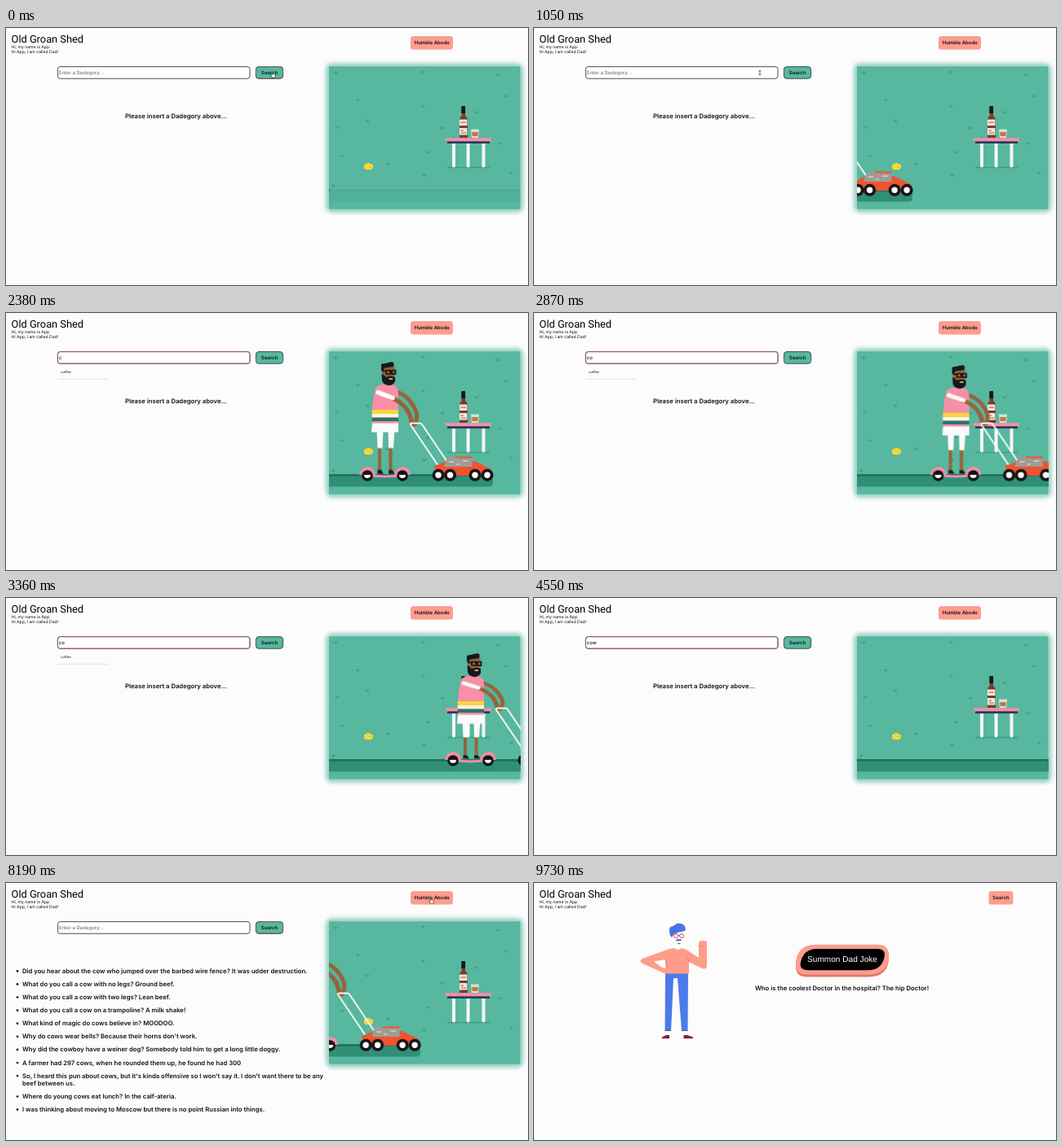
Animation of 640 by 316 pixels, one loop 9800 ms. Source, as an HTML page:

```html
<!DOCTYPE html>
<html lang="en">
<head>
<meta charset="utf-8">
<title>Old Groan Shed</title>
<style>
  html, body { margin: 0; width: 100%; height: 100%; overflow: hidden; background: #fcfcfc; }
  svg { display: block; width: 100%; height: 100%; }
  text { font: 600 7.7px Inter, "Open Sans", sans-serif; fill: #111; white-space: pre; text-rendering: geometricPrecision; }
  .title { font: 400 12.8px Roboto, Inter, sans-serif; fill: #000; }
  .sub { font-size: 5.1px; font-weight: 400; }
  .btn { font-size: 6px; text-anchor: middle; }
  .field { font-size: 6px; font-weight: 500; }
  .hint { fill: #777; }
  .option { font-size: 4.2px; font-weight: 400; }
  .summon { font: 400 10.1px "Liberation Sans", Arial, sans-serif; fill: #fff; text-anchor: middle; }
  .line { fill: none; stroke-linecap: round; stroke-linejoin: round; }
  .glow { filter: blur(2.6px); }

  .ride { animation: ride 9.8s linear infinite; }
  .trail { animation: trail 9.8s linear infinite; }
  .bob { animation: bob 653.333ms ease-in-out -233.333ms infinite; }
  .squash { animation: squash 653.333ms ease-in-out -233.333ms infinite; }
  .arm { transform-origin: 500px 137px; }
  .legs { transform-origin: 465px 195px; }
  .cursor { animation: cursor 9.8s ease-in-out infinite; }

  @keyframes ride {
    0%, 3.78% { transform: translateX(-201px); }
    17.86% { transform: translateX(-63px); }
    24.29% { transform: translateX(0); }
    34.29% { transform: translateX(105px); }
    43.88% { transform: translateX(206px); }
    43.89%, 72.14% { transform: translateX(-201px); }
    86.22% { transform: translateX(-63px); }
    100% { transform: translateX(77px); }
  }
  @keyframes trail {
    0% { opacity: .15; }
    4%, 43.87% { opacity: 0; }
    43.88%, 48% { opacity: 1; }
    57%, 68.5% { opacity: .15; }
    72.5%, 100% { opacity: 0; }
  }
  @keyframes bob { 50% { transform: translateY(8px); } }
  @keyframes squash { 50% { transform: scaleY(.82); } }
  @keyframes cursor {
    0%, 3% { transform: translate(327px, 55px); }
    11.5%, 48% { transform: translate(276px, 55px); }
    53%, 59% { transform: translate(324px, 55px); }
    62.8%, 76% { transform: translate(338px, 71px); }
    84%, 100% { transform: translate(522px, 19px); }
  }
</style>
</head>
<body>
<svg viewBox="0 0 640 316" preserveAspectRatio="none">
  <defs>
    <clipPath id="lawn"><rect x="396" y="47.3" width="234.5" height="175.4"/></clipPath>
    <g id="wheel"><circle r="7.5" fill="#151515"/><circle r="3.7" fill="#fff"/></g>
    <g id="fender">
      <path d="M-10 0Q-8-10 1-10Q9-9 10 0Z" fill="#f58ca8"/>
      <circle cy="1" r="6.8" fill="#151515"/><path d="M-4 0A4 4 0 0 0 4 0Z" fill="#fff"/>
    </g>
  </defs>

  <text class="title" x="6.6" y="17.6">Old Groan Shed</text>
  <text class="sub" x="6.6" y="25.2">Hi, my name is App.</text>
  <text class="sub" x="6.6" y="31.3">Hi App, I am called Dad!</text>

  <!-- search page -->
  <g data-on="0-8540">
    <rect x="496" y="10" width="52" height="16.5" rx="3.5" fill="#ff9c8f"/>
    <text class="btn" x="522.2" y="20.4">Humble Abode</text>

    <rect x="63.4" y="47.6" width="235.6" height="14.6" rx="3" fill="#fff" stroke="#3a3a3a" stroke-width=".9"/>
    <rect data-on="1400-5600" x="63.4" y="47.6" width="235.6" height="14.6" rx="3" fill="none" stroke="#9c5867" stroke-width=".9"/>
    <text data-on="0-2240,5810-8540" class="field hint" x="64.8" y="57.2">Enter a Dadegory...</text>
    <text data-on="2240-2800" class="field" x="64.8" y="57.2">c</text>
    <text data-on="2800-3700" class="field" x="64.8" y="57.2">co</text>
    <text data-on="3700-5810" class="field" x="64.8" y="57.2">cow</text>

    <rect x="306.4" y="47.6" width="33.2" height="14.6" rx="3.5" fill="#57b79f" stroke="#33413d" stroke-width=".9"/>
    <rect data-on="0-650,5100-8540" x="306.4" y="47.6" width="33.2" height="14.6" rx="3.5" fill="none" stroke="#8a5f5c" stroke-width=".9"/>
    <text class="btn" x="323" y="57.1">Search</text>

    <g data-on="1400-2240">
      <text class="option" x="67" y="73.6">staff</text>
      <text class="option" x="67" y="85.6">balloon</text>
      <text class="option" x="67" y="97.6">bird</text>
      <text class="option" x="67" y="109.6">coffee</text>
      <path d="M64 117.5H126" stroke="#c4c4c4" stroke-width=".8"/>
    </g>
    <g data-on="2240-3700">
      <text class="option" x="67" y="73.6">coffee</text>
      <path d="M64 81.3H126" stroke="#d8d8d8" stroke-width=".7"/>
    </g>

    <text data-on="0-5810" x="146" y="110.8">Please insert a Dadegory above...</text>
    <g id="jokes" data-on="5810-8540"></g>

    <rect class="glow" x="392" y="43.2" width="242.4" height="183.8" rx="8" fill="#57b79f" opacity=".62"/>
    <g clip-path="url(#lawn)">
      <rect x="396" y="47" width="235" height="176" fill="#57b79f"/>
      <path id="tufts" class="line" stroke="#3a947e" stroke-width=".9"/>
      <g class="trail">
        <path d="M396 198H631V213.6H396Z" fill="#2f9077"/>
        <path d="M396 198H631V201H396Z" fill="#23745f"/>
      </g>
      <g class="ride">
        <path d="M90 198H597V209Q597 213.6 592 213.6H90Z" fill="#2f9077"/>
        <path d="M90 198H590V201H90Z" fill="#23745f"/>
      </g>

      <path d="M439 171Q438 167 442 167Q444 164.500 447 167Q451 167.500 450 172Q448 175 444 174Q439 175 439 171Z" fill="#f4da35"/>
      <path d="M443 169L445 170M446 171L448 171" class="line" stroke="#d3b524" stroke-width=".7"/>

      <!-- table, bottle, glass -->
      <path d="M541 171.500H593" stroke="#3f9c86" stroke-width="1.500"/>
      <path d="M549 142V169.500M566.600 142V169.500M585.500 142V169.500" class="line" stroke="#f7f7f5" stroke-width="4"/>
      <path d="M541 138.500H593V142H541Z" fill="#2d3a5c"/>
      <path d="M538 135.200H595.500L594 139.200H540Z" fill="#f490a6"/>
      <path d="M558.700 103H563V108Q566 110 566 113V135H556V113Q556 110 558.700 108Z" fill="#7c3a2b"/>
      <rect x="558.300" y="96" width="4.800" height="9" rx="1" fill="#15191a"/>
      <path d="M556 112.500H565.500V120H556ZM556 123H565.500V131.500H556Z" fill="#efe6dc"/>
      <path d="M557.500 116H564M557.500 126H561" stroke="#b54b40" stroke-width="1.200"/>
      <path d="M558 129H564" stroke="#555" stroke-width=".8"/>
      <path d="M570 124.500H580L579.200 135H570.800Z" fill="#cfe3d5"/>
      <path d="M571.200 128H578.800L578.400 133H571.600Z" fill="#d2733a"/>

      <!-- rider and mower -->
      <g class="ride">
        <path d="M443 199Q464 203 486 199" class="line" stroke="#f58ca8" stroke-width="3"/>
        <use href="#fender" x="443" y="199"/>
        <use href="#fender" x="486" y="199"/>

        <g class="squash legs">
          <path d="M458 164V193M471.500 164V193" stroke="#96643a" stroke-width="4"/>
          <path d="M454.500 142H462.500L461.500 166H455.500ZM468.500 142H476.500L475 166H469Z" fill="#fbfbf9"/>
          <path d="M455.500 198V193H460L463 198ZM469 198V193H473.500L476.500 198Z" fill="#1b1b1d"/>
        </g>
        <path d="M479 97Q496 103 503 122Q505 130 501 137" class="line squash arm" stroke="#96643a" stroke-width="5"/>
        <g class="bob">
          <path d="M453 92Q456 88 464 87.500H472Q481 89 481 98V136H449Q448 110 453 92Z" fill="#f78fa7"/>
          <path d="M448.700 119H481V124H448.700Z" fill="#f6d936"/>
          <path d="M448.700 124H481V128.500H448.700Z" fill="#f7f4ee"/>
          <path d="M448.700 128.500H481V133H448.700Z" fill="#2b7569"/>
          <path d="M449 135.500H481V146.500H448Z" fill="#fbfbf9"/>
          <path d="M461 66H476.500V82H461Z" fill="#96643a"/>
          <path d="M460.500 75L463 76L466 79Q471 76 477 79V84Q475 89 469 89Q462 88 461 83Z" fill="#17181b"/>
          <path d="M460 70V65Q459 62 464 62L473 60Q477 61 475 66L464 67.500L462 72Z" fill="#17181b"/>
          <path d="M466 70.500H471V75H466ZM473 70.500H477.500V75H473Z" fill="#96643a" stroke="#111" stroke-width="1.600"/>
          <path d="M461 71.500H466M471 72H473" stroke="#111" stroke-width="1.300"/>
          <path d="M469.500 81H474" stroke="#f2d5cf" stroke-width="1.500"/>
        </g>
        <g class="squash arm">
          <path d="M471 103.500Q486 109 493 121Q497 129 498 137" class="line" stroke="#96643a" stroke-width="5.500"/>
          <path d="M456 97.500L474 104.500" class="line" stroke="#fbfbf9" stroke-width="5.500"/>
        </g>

        <path d="M530 188L496 137.500Q495 135.500 498 135.500H507Q509 135.500 510 137L541 183" class="line" stroke="#f6f6f3" stroke-width="2"/>
        <path d="M525 188L541 182H574L593 191Q597 193 596 200H528Z" fill="#f0532f"/>
        <path d="M537 189L541 177H571.500V189Z" fill="#9f9c98"/>
        <path d="M551 177.500H571" stroke="#f0532f" stroke-width="2"/>
        <path d="M543 183H549M552 186H556M560 182H567" stroke="#d3d0ca" stroke-width="1.600"/>
        <use href="#wheel" x="530" y="199.300"/>
        <use href="#wheel" x="544.500" y="199.300"/>
        <use href="#wheel" x="575" y="199.300"/>
        <use href="#wheel" x="590" y="199.300"/>
      </g>
    </g>

    <g data-on="0-2170,4690-8540"><g class="cursor">
      <path data-on="0-550,5100-5900,8000-8540" d="M-.6-1Q0-1.800.6-1V1.500L3 2.200Q3.600 2.500 3.200 4L2.600 6H-.6L-2.400 3Q-2.400 2-1.200 2.600L-.6 3Z" fill="#fff" stroke="#111" stroke-width=".6"/>
      <path data-on="550-2170,4690-5100" d="M-1.200-2.600Q0-2.600 0-1.800Q0-2.600 1.200-2.600M0-2V2M-1.200 2.600Q0 2.600 0 1.800Q0 2.600 1.200 2.600" class="line" stroke="#222" stroke-width=".7"/>
      <path data-on="5900-8000" d="M0 0V4.300L1 3.500L1.700 5L2.500 4.600L1.800 3.200H3.100Z" fill="#111" stroke="#fff" stroke-width=".3"/>
    </g></g>
  </g>

  <!-- single joke page -->
  <g data-on="8540-9800">
    <rect x="557.500" y="10" width="30" height="16.500" rx="3.500" fill="#ff9c8f"/>
    <text class="btn" x="572.500" y="20.400">Search</text>

    <path d="M161 110H189L188.500 182H181L176 117H171L168 182H160.500Z" fill="#4a7bea"/>
    <path d="M160.500 181.500H168M181 181.500H188.500" stroke="#3557b5" stroke-width="1.200"/>
    <path d="M157 191.300V189.500L162 187H166V191.300ZM183.500 191.300V187H188L195 189.500V191.300Z" fill="#84243f"/>
    <path d="M166 81L172 80Q177 84 181 80L187 82L202 92V74Q202 71 205 71H209Q212 71 212 74V102Q211 107 206 105L190 97V111.500H161L133 99Q128 96 133 93ZM161 94L147 96.500L157 104L161.500 105Z" fill="#ff9c8a" fill-rule="evenodd"/>
    <path d="M202 78H207M161 94L163 104M190 97L188 91" class="line" stroke="#db7567" stroke-width=".7"/>
    <path d="M168 60H185V71Q184 77 178 78L173 81L172 76Q168 72 168 60Z" fill="#fff"/>
    <path d="M166 60Q165 53 171 53Q176 47 183 51Q187 54 185 59Q177 60 171 63L169 67Q166 64 166 60Z" fill="#4a72e4"/>
    <path d="M169 64H171.500M176.500 64.500H178.500" stroke="#c94a62" stroke-width=".9"/>
    <g fill="none" stroke="#c94a62" stroke-width="1"><circle cx="174" cy="65" r="2.500"/><circle cx="181" cy="65" r="2.500"/></g>
    <path d="M173 71Q177 67 182 70.500Q178 71.500 173 71Z" fill="#4a72e4"/>
    <path d="M176 74.500H179.500" stroke="#c63f52" stroke-width="1.200"/>

    <path d="M346 78H421Q435 78 435 91Q435 115.500 410 115.500H335Q321 115.500 321 103Q321 78 346 78Z" fill="#dc7a6d"/>
    <path d="M346 75.700H421Q435 75.700 435 88.500Q435 112.500 410 112.500H335Q321 112.500 321 100.500Q321 75.700 346 75.700Z" fill="#ff9c8f"/>
    <path d="M347 81H421Q430 81 430 88Q428 107.300 409 107.300H336Q326.500 107.300 326.500 100Q329 81 347 81Z" fill="#000"/>
    <text class="summon" x="378" y="97.300">Summon Dad Joke</text>
    <text data-on="9000-9800" x="271" y="131.600">Who is the coolest Doctor in the hospital? The hip Doctor!</text>
  </g>
</svg>
<script>
  const LOOP = 9800;

  const jokes = [
    "Did you hear about the cow who jumped over the barbed wire fence? It was udder destruction.",
    "What do you call a cow with no legs? Ground beef.",
    "What do you call a cow with two legs? Lean beef.",
    "What do you call a cow on a trampoline? A milk shake!",
    "What kind of magic do cows believe in? MOODOO.",
    "Why do cows wear bells? Because their horns don't work.",
    "Why did the cowboy have a weiner dog? Somebody told him to get a long little doggy.",
    "A farmer had 297 cows, when he rounded them up, he found he had 300",
    "So, I heard this pun about cows, but it's kinda offensive so I won't say it. I don't want there to be any|beef between us.",
    "Where do young cows eat lunch? In the calf-ateria.",
    "I was thinking about moving to Moscow but there is no point Russian into things."
  ];
  let y = 110.8;
  document.getElementById("jokes").innerHTML = jokes.map(joke => {
    const lines = joke.split("|");
    const dot = `<circle cx="14" cy="${y - 2.5}" r="1.35" fill="#111"/>`;
    const rows = lines.map((s, i) => `<text x="20" y="${y + i * 9.3}">${s}</text>`).join("");
    y += 16.1 + (lines.length - 1) * 9.3;
    return dot + rows;
  }).join("");

  const tufts = [[404, 55], [511, 54], [603, 58], [613, 84], [431, 89], [511, 96], [577, 104], [443, 114],
    [406, 122], [535, 123], [605, 142], [517, 153], [412, 157], [468, 167], [513, 181], [619, 178], [401, 194]];
  document.getElementById("tufts").setAttribute("d",
    tufts.map(([x, y]) => `M${x - 2} ${y - 1}l1.3 2m.7-2.2v2.2m2-2l-1 2`).join(""));

  // data-on="from-to,from-to" in ms: shown only in those spans
  for (const el of document.querySelectorAll("[data-on]")) {
    const steps = [{ opacity: 0, offset: 0 }];
    for (const span of el.dataset.on.split(",")) {
      const [from, to] = span.split("-").map(Number);
      steps.push({ opacity: 1, offset: from / LOOP }, { opacity: 0, offset: to / LOOP });
    }
    steps.push({ opacity: 0, offset: 1 });
    el.animate(steps.map(s => ({ ...s, easing: "step-end" })), { duration: LOOP, iterations: Infinity });
  }
</script>
</body>
</html>
```
